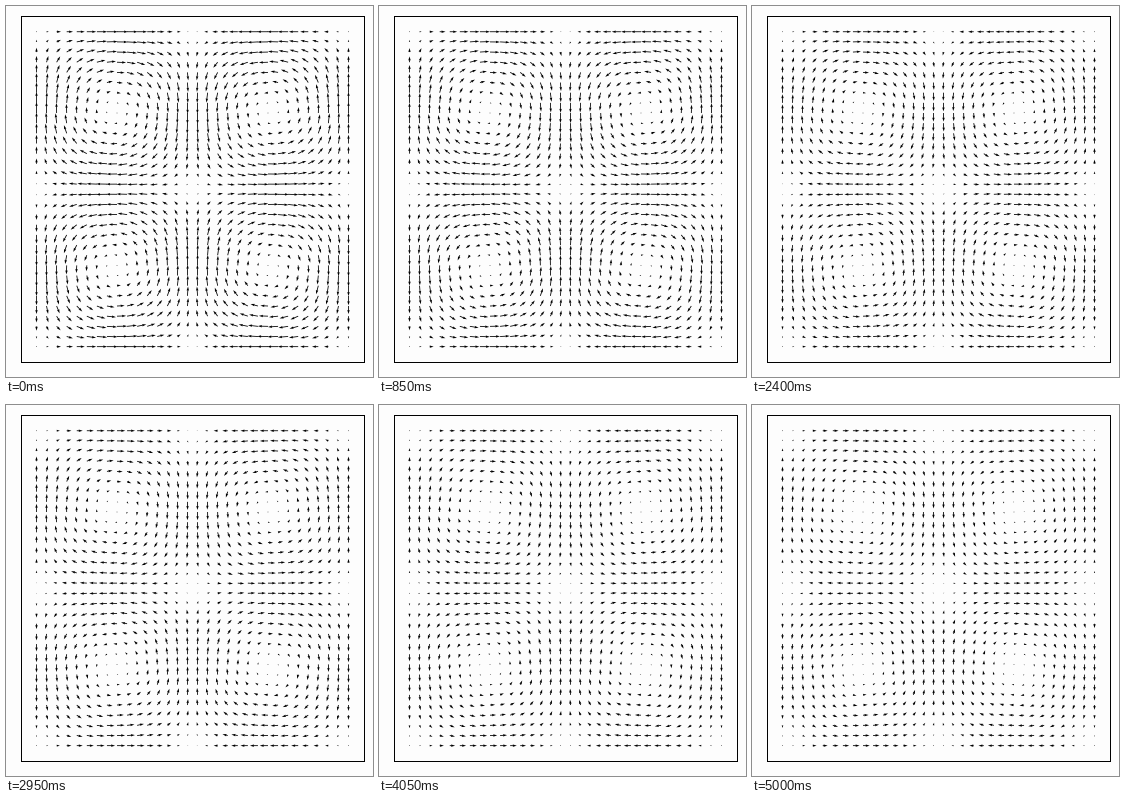
These frames come from a looping animation (367 by 371 pixels, 5.05 s). A matplotlib script:

```python
import numpy as np
import matplotlib.pyplot as plt
from matplotlib.animation import FuncAnimation

W, H, DPI = 367, 371, 64
FRAMES, STEP_MS = 101, 50
N = 32
DECAY = 0.005          # damping rate per frame
SCALE = 31             # speed that would span the axes width
PAPER = "#fdfdfd"

# Decaying Taylor-Green vortices on [0, 2 pi]^2
side = np.linspace(0, 2 * np.pi, N)
x, y = np.meshgrid(side, side)
u0 = np.sin(x) * np.cos(y)
v0 = -np.cos(x) * np.sin(y)

fig = plt.figure(figsize=(W / DPI, H / DPI), dpi=DPI, facecolor=PAPER)
left, right, top, bottom = 14.9, 358.1, 10, 356.4
ax = fig.add_axes([left / W, 1 - bottom / H,
                   (right - left) / W, (bottom - top) / H], facecolor=PAPER)
margin = 0.05 * 2 * np.pi
ax.set(xlim=(-margin, 2 * np.pi + margin), ylim=(-margin, 2 * np.pi + margin),
       xticks=[], yticks=[])
for spine in ax.spines.values():
    spine.set_linewidth(72 / DPI)

arrows = ax.quiver(x, y, u0, v0, scale=SCALE, width=0.06 / 25, color="black")


def update(i):
    fade = np.exp(-DECAY * i)
    arrows.set_UVC(u0 * fade, v0 * fade)
    return arrows,


anim = FuncAnimation(fig, update, frames=FRAMES, interval=STEP_MS,
                     init_func=lambda: update(0), repeat=True, repeat_delay=0)
plt.show()
```
